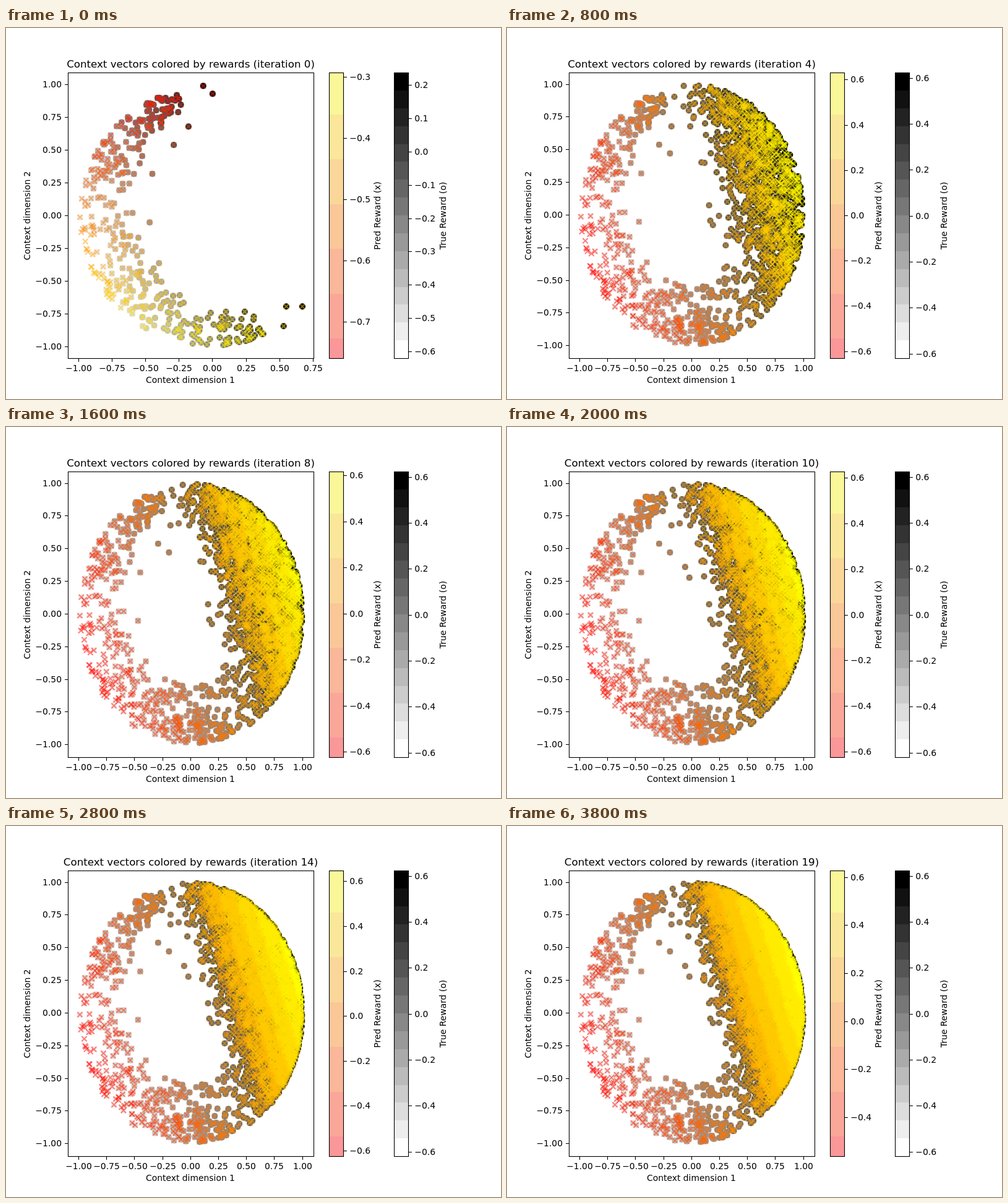
These frames come from a looping animation (800x600 px, 4 s). An HTML page with a canvas:

```html
<!DOCTYPE html>
<html lang="en">
<head>
<meta charset="utf-8">
<title>Context vectors</title>
<style>
  html, body { margin: 0; width: 100%; height: 100%; overflow: hidden; background: #fff; }
  canvas, svg { position: absolute; left: 0; top: 0; width: 800px; height: 600px; }
  text { font: 13.89px "DejaVu Sans", sans-serif; fill: #000; }
  .title { font-size: 16.67px; }
  .line { fill: none; stroke: #000; stroke-width: 1.1; }
</style>
</head>
<body>
<canvas id="dots" width="800" height="600"></canvas>
<svg id="chart" viewBox="0 0 800 600"></svg>
<script>
const STEP = 200, STEPS = 20, BATCH = 390;
const TOP = 72, HEIGHT = 462;

// Outermost and innermost points of the first batch
const landmarks = [
  [.67, -.69], [.55, -.69], [.53, -.84], [.24, -.73], [.1, -.73], [-.07, .99],
  [0, .93], [-.18, .68], [-.29, .54], [-.45, .32], [-.47, -.05], [-.4, -.36]
];

// Prediction bar at a few steps: [step, min, max]
const predKeys = [[1, -.57, .6], [4, -.631, .631], [6, -.623, .607], [14, -.625, .648], [19, -.5625, .628]];

let seed = 20417;
function rand() {
  seed = (seed + 0x6D2B79F5) | 0;
  let t = Math.imul(seed ^ (seed >>> 15), 1 | seed);
  t = (t + Math.imul(t ^ (t >>> 7), 61 | t)) ^ t;
  return ((t ^ (t >>> 14)) >>> 0) / 4294967296;
}
const between = (a, b) => a + (b - a) * rand();
const clamp = v => Math.max(0, Math.min(1, v));
const reward = (x, y) => .58 * x + .21 * y;

function polar(deg, r) {
  const a = deg * Math.PI / 180;
  return [r * Math.cos(a), r * Math.sin(a)];
}

// Point of the disk, kept mostly where the reward is above mid
function rewarded(mid, width) {
  for (;;) {
    const p = polar(between(0, 360), .998 * rand() ** .44);
    if (rand() < 1 / (1 + Math.exp((mid - reward(...p)) / width))) return p;
  }
}
// Left arc, widest in the middle and denser at the rim
function crescent() {
  const u = rand();
  const width = .16 + .26 * Math.sin(Math.PI * u);
  return polar(105 + 189 * u, .99 - width * rand() ** 1.5);
}
function lowerArc() {
  return polar(between(240, 318), .99 - .45 * rand() ** 1.2);
}

function makePoint(step) {
  if (step === 0) return crescent();
  if (step === 1) return rand() < .34 ? lowerArc() : rewarded(.25, .06);
  return rewarded(.29, .042);
}
const points = [...landmarks], counts = [];
for (let step = 0; step < STEPS; step++) {
  for (let i = 0; i < BATCH; i++) points.push(makePoint(step));
  counts.push(points.length);
}

function predRange(step) {
  if (step === 0) return [-.7595, -.293];
  const i = Math.max(1, predKeys.findIndex(k => k[0] >= step));
  const [a, b] = [predKeys[i - 1], predKeys[i]];
  const u = (step - a[0]) / (b[0] - a[0]);
  return [1, 2].map(k => a[k] + (b[k] - a[k]) * u);
}
const trueRange = step => [-.62, step ? Math.min(.624, .606 + .007 * step) : .237];

function scales(step) {
  const xMax = step ? Math.min(.999, .988 + .004 * step) : .67;
  const yMin = step ? -.994 : -.985;
  return {
    x: v => 118.05 + (v + .997) / (xMax + .997) * 360.9,
    y: v => 93 + (.993 - v) / (.993 - yMin) * 420
  };
}

const ctx = document.getElementById('dots').getContext('2d');
function drawDots(step) {
  const { x, y } = scales(step), [lo, hi] = trueRange(step);
  const shown = points.slice(0, counts[step]);
  const level = p => clamp((reward(...p) - lo) / (hi - lo));
  ctx.clearRect(0, 0, 800, 600);
  for (const p of shown) {
    const g = 255 - 17 * Math.round(level(p) * 15);
    ctx.fillStyle = `rgb(${g},${g},${g})`;
    ctx.beginPath();
    ctx.arc(x(p[0]), y(p[1]), 5.1, 0, 7);
    ctx.fill();
  }
  ctx.lineWidth = 2.08;
  for (const p of shown) {
    const t = step ? level(p) : clamp(.5 - .47 * p[1]);
    const cx = x(p[0]), cy = y(p[1]), d = 4.17;
    ctx.strokeStyle = `rgba(255,${17 * Math.round(t * 15)},0,.5)`;
    ctx.beginPath();
    ctx.moveTo(cx - d, cy - d); ctx.lineTo(cx + d, cy + d);
    ctx.moveTo(cx - d, cy + d); ctx.lineTo(cx + d, cy - d);
    ctx.stroke();
  }
}

const label = (x, y, s, anchor = 'middle', extra = '') =>
  `<text x="${x}" y="${y}" text-anchor="${anchor}" ${extra}>${s}</text>`;
const upright = (x, y, s) => label(x, y, s, 'middle', `transform="rotate(-90 ${x} ${y})"`);
const num = (v, digits) => (v < -1e-9 ? '\u2212' : '') + Math.abs(v).toFixed(digits);
const frame = (x, w) => `<rect class="line" x="${x + .5}" y="${TOP + .5}" width="${w}" height="${HEIGHT}"/>`;
const tick = (x, y, dx, dy) => `<path class="line" d="M${x} ${y}l${dx} ${dy}"/>`;
const snap = v => Math.floor(v) + .5;

// Bar cell between two fractions of the bar's height
function band(x, from, to, fill) {
  const [a, b] = [from, to].map(f => Math.round(TOP + clamp(f) * HEIGHT));
  return `<rect x="${x}" y="${a}" width="24" height="${b - a}" fill="${fill}" shape-rendering="crispEdges"/>`;
}
function barAxis(x, [lo, hi], gap) {
  let out = frame(x, 23);
  for (let k = Math.ceil(lo / gap); k * gap <= hi; k++) {
    const y = snap(TOP + .5 + (hi - k * gap) / (hi - lo) * HEIGHT);
    out += tick(x + 24, y, 4.9, 0) + label(x + 33.3, y + 4.7, num(k * gap, 1), 'start');
  }
  return out;
}

function drawChart(step) {
  const { x, y } = scales(step), gap = step ? .2 : .1;
  let out = frame(100, 397);
  for (let k = -4; k <= 4; k++) {
    const px = snap(x(k / 4)), py = snap(y(k / 4) - .5);
    if (px < 498) out += tick(px, 535, 0, 4.9) + label(px, 555, num(k / 4, 2));
    out += tick(100, py, -4.9, 0) + label(90, py + 4.7, num(k / 4, 2), 'end');
  }
  out += label(298.5, 64, `Context vectors colored by rewards (iteration ${step})`, 'middle', 'class="title"');
  out += label(298, 574, 'Context dimension 1') + upright(39, 303.5, 'Context dimension 2');

  // The pale bar runs from green 255 to 153 in cells of 16
  for (let g = 255; g > 153; g = g === 255 ? 240 : g - 16) {
    const next = g === 255 ? 240 : g - 16;
    out += band(522, (255 - g) / 102, (255 - next) / 102, `rgb(250,${Math.round((g + next) / 2) - 1},153)`);
  }
  for (let i = 0; i < 16; i++) {
    const g = 17 * i;
    out += band(627, i / 16, (i + 1) / 16, `rgb(${g},${g},${g})`);
  }
  out += barAxis(522, predRange(step), gap) + barAxis(627, trueRange(step), gap);
  out += upright(605, 303.5, 'Pred Reward (x)') + upright(711, 303.5, 'True Reward (o)');
  document.getElementById('chart').innerHTML = out;
}

let current = -1;
const start = performance.now();
function play() {
  const step = Math.floor((performance.now() - start) / STEP) % STEPS;
  if (step !== current) {
    current = step;
    drawDots(step);
    drawChart(step);
  }
  requestAnimationFrame(play);
}
play();
</script>
</body>
</html>
```
